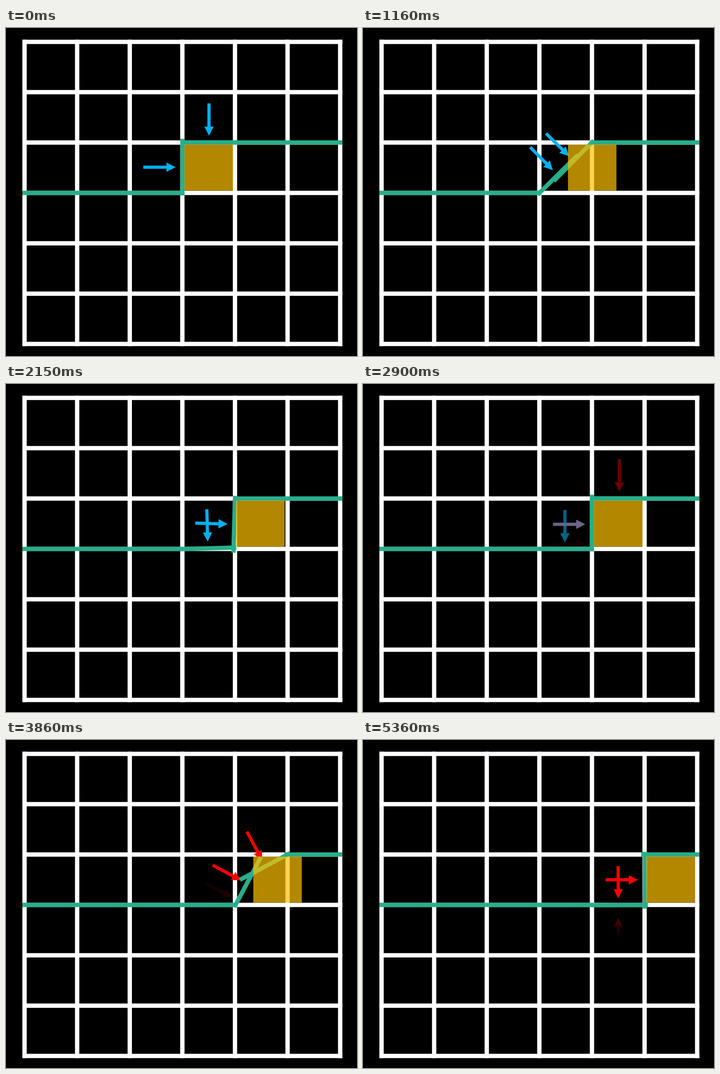
An HTML page that plays this animation: 772x721 px, repeating every 5.61 s.

```html
<!DOCTYPE html>
<html lang="en">
<head>
<meta charset="utf-8">
<title>Grid step</title>
<style>
  html, body { margin: 0; width: 100%; height: 100%; overflow: hidden; background: #000; }
  svg { display: block; width: 772px; height: 721px; }
</style>
</head>
<body>
<svg viewBox="0 0 772 721" xmlns="http://www.w3.org/2000/svg">
  <defs>
    <path id="arrow" d="M-35.5-3.5H15.5V-10.2L35.5 0 15.5 10.2V3.5H-35.5Z"/>
    <linearGradient id="fadeAhead" gradientUnits="userSpaceOnUse" x1="35" y1="0" x2="-8" y2="0">
      <stop offset="0" stop-color="#f00" stop-opacity=".32"/>
      <stop offset="1" stop-color="#f00" stop-opacity="0"/>
    </linearGradient>
    <linearGradient id="fadeBeside" gradientUnits="userSpaceOnUse" x1="-36" y1="0" x2="36" y2="0">
      <stop offset="0" stop-color="#f00" stop-opacity=".08"/>
      <stop offset="1" stop-color="#f00" stop-opacity=".22"/>
    </linearGradient>
  </defs>
  <rect width="772" height="721"/>
  <path id="grid" stroke="#fff" stroke-width="9.5" fill="none"/>
  <g id="red" fill="#f00"></g>
  <g id="blue" fill="#00b0f0"></g>
  <path id="wall" stroke="#28ae8a" stroke-width="9.5" fill="none"/>
  <g id="bars" fill="#28ae8a"></g>
  <rect id="cell" y="256.3" width="106.6" height="101.2" fill="#ffc000" fill-opacity=".7"/>
</svg>
<script>
const NS = 'http://www.w3.org/2000/svg';
const LOOP = 5610, HOLD = 248, LEAD = 386;
const TURN = 9.5;  // length of one quarter turn, in held poses
const $ = id => document.getElementById(id);
const clamp = x => Math.min(1, Math.max(0, x));

function add(parent, tag, attrs) {
  const el = document.createElementNS(NS, tag);
  for (const k in attrs) el.setAttribute(k, attrs[k]);
  return parent.appendChild(el);
}

let lines = '';
for (let i = 0; i < 7; i++) {
  lines += `M${40.8 + 115.7 * i} 25.6V699.4M36 ${30.4 + 110.7 * i}H740`;
}
$('grid').setAttribute('d', lines);

// An arm is a bar and its arrow, both turning a quarter around one pivot.
function arm(layer, turn, pivot, center, drift = 0) {
  const [px, py] = pivot;
  const bar = add($('bars'), 'rect', turn > 0
    ? { x: px - 4.3, y: py - 119, width: 9.5, height: 124.5 }
    : { x: px - 119.5, y: py - 4.6, width: 125, height: 9.5 });
  const group = add($(layer), 'g', {});
  const place = add(group, 'g', {
    transform: `translate(${center}) rotate(${turn > 0 ? 0 : 90})`
  });
  add(place, 'use', { href: '#arrow' });
  return { turn, pivot, drift, bar, group, place };
}

const first = [
  arm('blue', -1, [503.5, 251.3], [446.5, 201.2]),
  arm('blue', 1, [387.6, 362.5], [337.5, 306])
];
const second = [
  arm('red', -1, [620, 251.2], [563.8, 200.5]),
  arm('red', 1, [503, 362.5], [453.5, 308.7], 4.6)
];

// Faint reflections of the last arrow: beside it at first, ahead of it later.
const host = second[1].place;
const beside = add(host, 'use', { href: '#arrow', fill: 'url(#fadeBeside)', y: 42.5 });
const ahead = add(host, 'use', {
  href: '#arrow', fill: 'url(#fadeAhead)', transform: 'translate(114 0) scale(-1 1)'
});

// Cosine ease with a long tail.
function ease(x) {
  const w = 1 - Math.pow(1 - clamp(x), 1.84);
  return (1 - Math.cos(Math.PI * w)) / 2;
}

function pose(arms, p, showBars) {
  for (const a of arms) {
    const move = `translate(${a.drift * p} 0) rotate(${a.turn * 90 * p} ${a.pivot})`;
    a.bar.setAttribute('transform', move);
    a.bar.setAttribute('display', showBars ? 'inline' : 'none');
    a.group.setAttribute('transform', move);
  }
}

function draw(time) {
  const n = Math.max(0, Math.floor((time % LOOP - LEAD) / HOLD));
  const p1 = ease(n / TURN);
  const p2 = ease((n - 11.85) / TURN);
  const fade = clamp((n - 9) * 0.43);
  const late = fade > 0;
  pose(first, p1, !late);
  pose(second, p2, late);
  beside.setAttribute('opacity', clamp(1 - 1.3 * p2));
  ahead.setAttribute('opacity', p2);
  $('red').setAttribute('opacity', fade);
  $('blue').setAttribute('opacity', 1 - fade);
  $('blue').style.mixBlendMode = late ? 'screen' : 'normal';
  $('wall').setAttribute('d', late
    ? 'M36 362.5H508M612 251.7H740'
    : 'M36 362.5H392M499 251.7H740');
  $('cell').setAttribute('x', 392.6 + 115.5 * (p1 + p2));
}

const start = performance.now();
function tick() {
  draw(performance.now() - start);
  requestAnimationFrame(tick);
}
tick();
</script>
</body>
</html>
```
